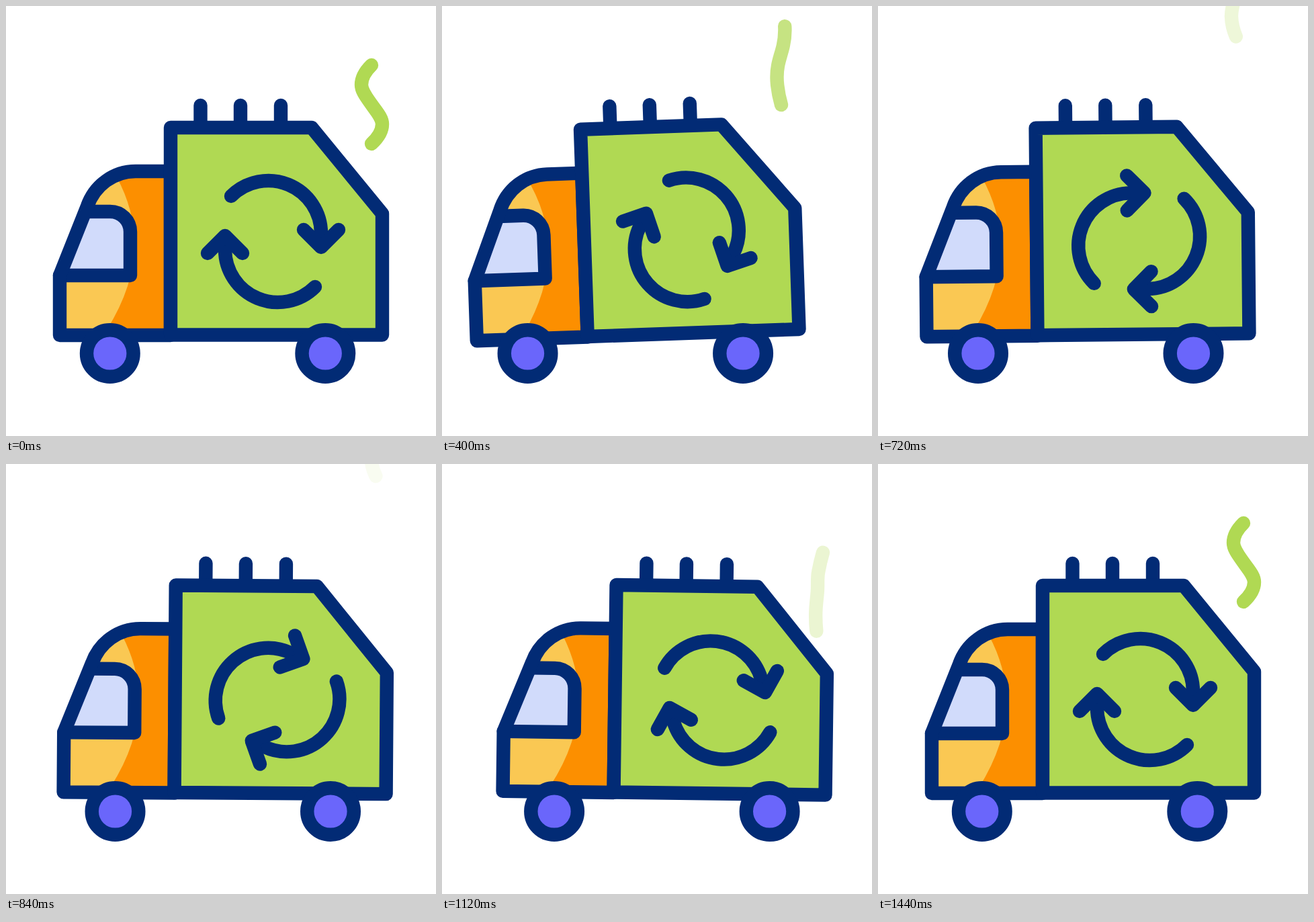
An HTML page that plays this animation: 640 by 640 pixels, repeating every 1480 ms.

```html
<!DOCTYPE html>
<html lang="en">
<head>
<meta charset="utf-8">
<title>Recycling truck</title>
<style>
  html, body { margin: 0; width: 100%; height: 100%; overflow: hidden; background: #fff; }
  svg { display: block; width: 100vw; height: 100vh; }
  .line { fill: none; stroke: #022b75; stroke-width: 20.4; stroke-linecap: round; stroke-linejoin: round; }
  .wheel { fill: #6a66fb; stroke: #022b75; stroke-width: 20.4; }
  #smoke { fill: none; stroke: #b0d953; stroke-width: 20.4; stroke-linecap: round; }
</style>
</head>
<body>
<svg viewBox="0 0 640 640">
  <defs>
    <g id="arrow" class="line">
      <path d="M335 283A78.5 78.5 0 0 1 469 338.5V358"/>
      <path d="M443 333L469 359L495 333"/>
    </g>
  </defs>
  <path id="smoke"/>
  <g id="body">
    <path id="cab" fill="#fac853" d="M245 246H193C160 246 132 267 121 298L80 401V490H245Z"/>
    <path fill="#fc8f00" d="M160 246Q227 360 150 482H245V246Z"/>
    <path fill="#d1dbfb" d="M119 306H155A30 30 0 0 1 185 336V401H80Z"/>
    <path class="line" d="M119 306H155A30 30 0 0 1 185 336V401H80"/>
    <path class="line" d="M245 246H193C160 246 132 267 121 298L80 401V490H245Z"/>
    <path class="line" d="M289.5 148V181M349 148V181M409 148V181"/>
    <path class="line" style="fill:#b0d953" d="M245 181H455L560 309V489.5H245Z"/>
    <g id="arrows">
      <use href="#arrow"/>
      <use href="#arrow" transform="rotate(180 397.5 350.5)"/>
    </g>
  </g>
  <g id="wheels">
    <circle class="wheel" cx="154.8" cy="517" r="34.8"/>
    <circle class="wheel" cx="475.3" cy="517" r="34.8"/>
  </g>
</svg>
<script>
const LOOP = 1480, STEP = 40;
const KEYS = [80, 440, 1000, 1360];
const TILT = [0, -2.06, 1, 0];
const ROLL = [0, -28.2, 16.6, 0];
// x of five points down the smoke, one row per key time
const WAVE = [
  [544, 529, 544, 560, 544],
  [509, 507, 498.5, 497, 503.6],
  [575, 571, 564, 555, 562],
  [544, 529, 544, 560, 544]
];
const GAP = 29.25;

const el = id => document.getElementById(id);
const body = el('body'), wheels = el('wheels'), arrows = el('arrows'), smoke = el('smoke');

const ease = (t, from, to) => {
  const u = Math.min(1, Math.max(0, (t - from) / (to - from)));
  return u * u * (3 - 2 * u);
};
const mix = (a, b, k) => a + (b - a) * k;

function along(values, t) {
  let i = 0;
  while (i < 2 && t >= KEYS[i + 1]) i++;
  return mix(values[i], values[i + 1], ease(t, KEYS[i], KEYS[i + 1]));
}

function wavePath(xs, top) {
  const slope = xs.map((x, i) => (xs[i + 1] - xs[i - 1]) * 0.65);
  slope[0] = 2 * (xs[1] - xs[0]) - slope[1];
  slope[4] = 2 * (xs[4] - xs[3]) - slope[3];
  let d = `M${xs[0]} ${top}`;
  for (let i = 0; i < 4; i++) {
    const y = top + i * GAP;
    d += `C${xs[i] + slope[i] / 3} ${y + GAP / 3} ` +
         `${xs[i + 1] - slope[i + 1] / 3} ${y + GAP * 2 / 3} ${xs[i + 1]} ${y + GAP}`;
  }
  return d;
}

function draw(t) {
  const tilt = along(TILT, t);
  body.setAttribute('transform', `translate(${17.2 * tilt} 0) rotate(${tilt} 320 320)`);
  wheels.setAttribute('transform', `translate(${along(ROLL, t)} 0)`);
  arrows.setAttribute('transform', `rotate(${180 * ease(t, 80, 1360)} 397.5 350.5)`);

  const back = t >= 1000;
  const fresh = ease(t, 1000, 1360);
  const rise = back ? 59 * (1 - fresh) : -200 * ease(t, 80, 980);
  const xs = WAVE[0].map((_, i) => along(WAVE.map(row => row[i]), t));
  smoke.setAttribute('d', wavePath(xs, 88 + rise));
  smoke.setAttribute('opacity', back ? fresh : 1 - ease(t, 80, 1000));
}

const start = performance.now();
function tick() {
  const t = (performance.now() - start) % LOOP;
  draw(Math.floor(t / STEP) * STEP);
  requestAnimationFrame(tick);
}
tick();
</script>
</body>
</html>
```
